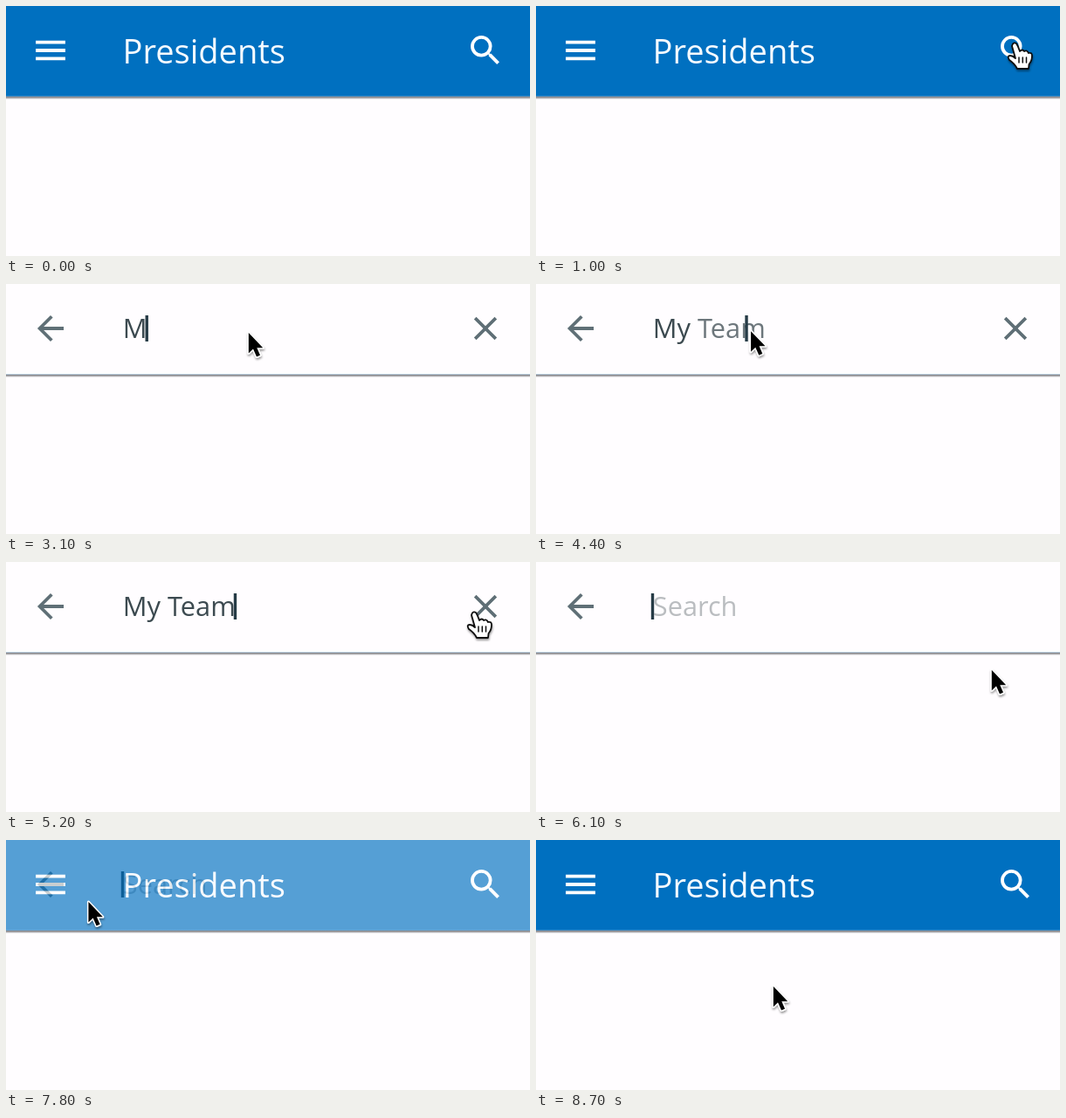
An HTML page that plays this animation: 600 px wide and 287 px high, repeating every 9200 ms.

```html
<!DOCTYPE html>
<html lang="en">
<head>
<meta charset="utf-8">
<title>Search bar</title>
<style>
  html, body { margin: 0; height: 100%; overflow: hidden; background: #fffdff; }
  svg { display: block; width: 100vw; height: 100vh; }
  text { font-family: "Open Sans", "Noto Sans", sans-serif; font-size: 30.72px; white-space: pre; }
  .title { font-size: 38px; }
  .left { transform: translate(51px, 51px) scale(1.88) translate(-12px, -12px); }
  .right { transform: translate(549px, 51px) scale(1.88) translate(-12px, -12px); }
</style>
</head>
<body>
<svg viewBox="0 0 600 287">
  <defs>
    <filter id="soft" x="-50%" y="-50%" width="200%" height="200%">
      <feDropShadow dx="0.5" dy="2" stdDeviation="1.3" flood-opacity=".4"/>
    </filter>
    <linearGradient id="shade" x2="0" y2="1">
      <stop stop-color="#55565c" stop-opacity=".85"/>
      <stop offset=".4" stop-color="#55565c" stop-opacity=".6"/>
      <stop offset="1" stop-color="#55565c" stop-opacity="0"/>
    </linearGradient>
  </defs>
  <rect width="600" height="287" fill="#fffdff"/>
  <rect y="103.7" width="600" height="3.6" fill="url(#shade)"/>

  <g fill="#fff">
    <rect width="600" height="103.7" fill="#0070c0"/>
    <path class="left" d="M3 18h18v-2H3zm0-5h18v-2H3zm0-7v2h18V6z"/>
    <text class="title" x="133.6" y="66" fill="#f4faff">Presidents</text>
    <path class="right" d="M15.5 14h-.79l-.28-.27A6.47 6.47 0 0 0 16 9.5 6.5 6.5 0 1 0 9.5 16c1.61 0 3.09-.59 4.23-1.57l.27.28v.79l5 4.99L20.49 19zm-6 0a4.5 4.5 0 1 1 0-9 4.5 4.5 0 0 1 0 9z"/>
  </g>

  <g id="search" fill="#5f6f76">
    <rect width="600" height="103.7" fill="#fffdff"/>
    <path class="left" d="M20 11H7.83l5.59-5.59L12 4l-8 8 8 8 1.41-1.41L7.83 13H20z"/>
    <path id="clear" class="right" d="M19 6.41 17.59 5 12 10.59 6.41 5 5 6.41 10.59 12 5 17.59 6.41 19 12 13.41 17.59 19 19 17.59 13.41 12z"/>
    <text id="hint" x="133.8" y="62.3" fill="#babdc0">Search</text>
    <text x="133.8" y="62.3" fill="#3c4a50"><tspan id="first"></tspan><tspan id="second"></tspan></text>
    <rect id="caret" y="36" width="3.4" height="30" fill="#263b46"/>
  </g>

  <g id="pointer" filter="url(#soft)">
    <path id="arrow" d="M.8 1V24.500L6 19.500 10 28.500 14 26.800 10.300 18.200H17.200Z" stroke="#fff" stroke-width="3" stroke-linejoin="round" paint-order="stroke"/>
    <g id="hand" fill="#fff" stroke="#111" stroke-width="1.8" stroke-linejoin="round" stroke-linecap="round">
      <path d="M-2 4Q-1 -1 3 1Q5 4 7 10Q10 7 12 10Q15 8 17 12Q21 11 21 15Q21 21 17.500 25L17 30H4Q1 24 -5 20Q-8 15 -4 15Q-1 15 2 18Z"/>
      <path d="M6 17V23M10.300 17V23M14.500 17V23" stroke-width="1.500"/>
    </g>
  </g>
</svg>
<script>
const LOOP = 9200, STEP = 100, BLINK = 900, TEXT_X = 133.8;
const OPEN = 1700, TYPE_M = 2900, TYPE_Y = 3900, TYPE_TEAM = 4300,
      CLEAR = 5600, REFOCUS = 6000, CLOSE = 7700;

// Pointer strokes; it rests in between. A dip bends the path downwards.
const strokes = [
  { from: 600, to: 1000, x: 547, y: 42 },
  { from: 1800, to: 2400, x: 277, y: 55 },
  { from: 3200, to: 3600, x: 235, y: 53 },
  { from: 4300, to: 5200, x: 535, y: 57 },
  { from: 5900, to: 6100, x: 521, y: 123 },
  { from: 6100, to: 6900, x: 92, y: 87, dip: 100 },
  { from: 6900, to: 7300, x: 68, y: 56 },
  { from: 7600, to: 8500, x: 271, y: 167 }
];

const el = id => document.getElementById(id);
const set = (id, name, value) => el(id).setAttribute(name, value);
const ramp = (from, to, t) => Math.min(1, Math.max(0, (t - from) / (to - from)));
const ease = p => p * p * (3 - 2 * p);

function pointerAt(t) {
  let x = 612, y = 78;
  for (const s of strokes) {
    const p = ease(ramp(s.from, s.to, t));
    x += (s.x - x) * p;
    y += (s.y - y) * p + (s.dip || 0) * Math.sin(Math.PI * p);
  }
  return [x, y];
}

function caretLit(t) {
  const wake = [OPEN, TYPE_M, TYPE_Y, TYPE_TEAM, REFOCUS].filter(e => e <= t).pop();
  return (t - wake) % BLINK < BLINK / 2;
}

function draw(now) {
  const t = Math.floor(now % LOOP / STEP) * STEP;
  const open = ramp(OPEN - 100, OPEN + 100, t) - ramp(CLOSE - 100, CLOSE + 200, t);
  const full = ramp(TYPE_M - 100, TYPE_M + 100, t) - ramp(CLEAR - 100, CLEAR + 100, t);
  const team = ramp(TYPE_TEAM - 50, TYPE_TEAM + 150, t);
  const typing = t >= TYPE_M && t <= CLEAR;

  const [x, y] = pointerAt(t);
  const near = cx => Math.hypot(x - cx, y - 51) < 30;
  const hand = near(51) || near(549) && (open < 1 || full > 0);
  set("pointer", "transform", `translate(${x} ${y})`);
  set("arrow", "opacity", hand ? 0 : 1);
  set("hand", "opacity", hand ? 1 : 0);

  set("search", "opacity", open);
  set("clear", "opacity", full);
  set("hint", "opacity", 1 - full);
  el("first").textContent = !typing ? "" : t < TYPE_Y ? "M" : "My";
  el("second").textContent = typing && team ? " Team" : "";
  set("second", "fill-opacity", team);

  const width = id => el(id).getComputedTextLength();
  set("caret", "x", TEXT_X - 2 + width("first") + width("second") * team);
  set("caret", "opacity", caretLit(t) ? 1 : 0);
}

const start = performance.now();
function tick() {
  draw(performance.now() - start);
  requestAnimationFrame(tick);
}
draw(0);
requestAnimationFrame(tick);
</script>
</body>
</html>
```
